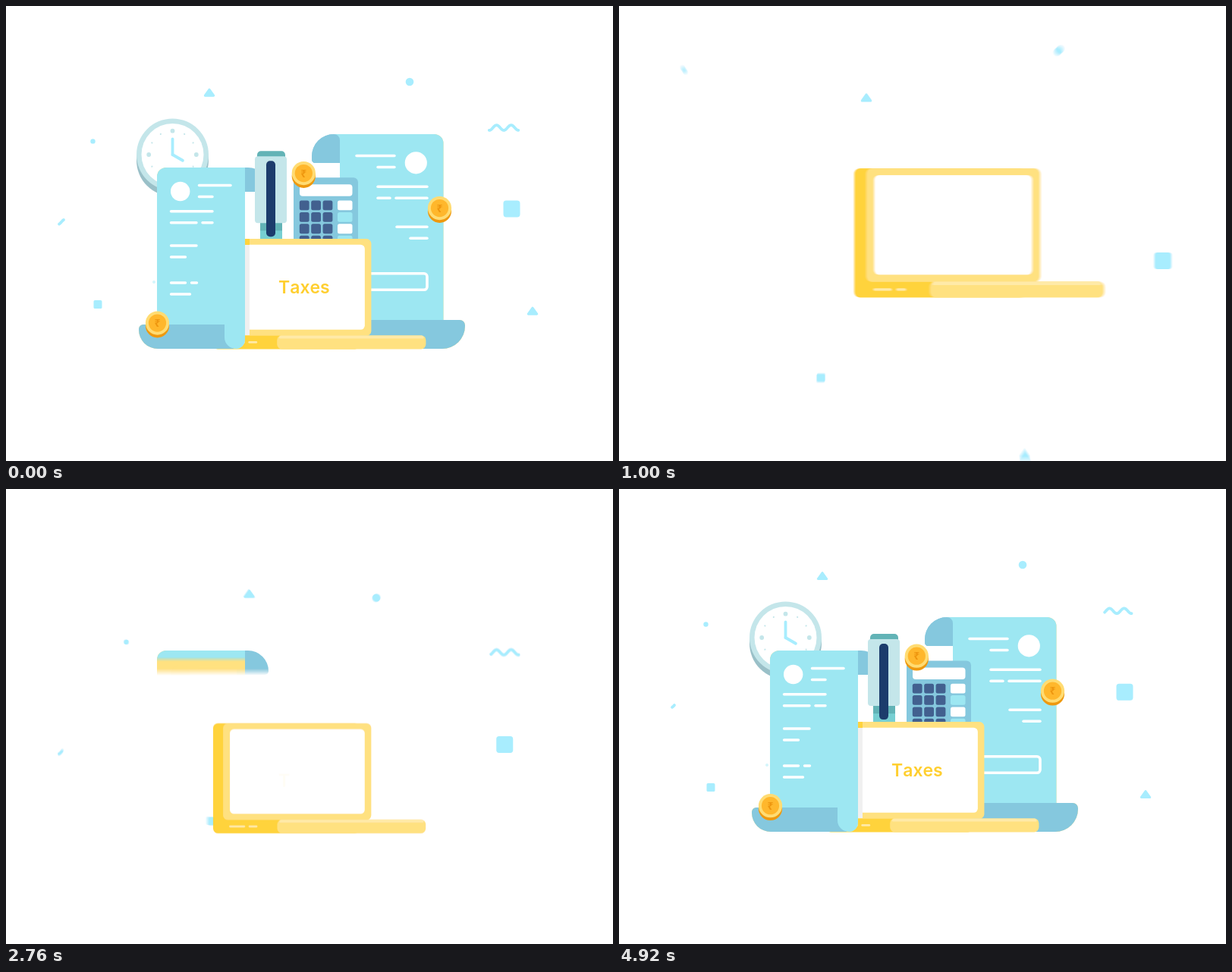
An HTML page with a canvas for the animation above (4960 ms loop, 800x600 px).

```html
<!DOCTYPE html>
<html lang="en">
<head>
<meta charset="utf-8">
<title>Taxes</title>
<style>
  html, body { margin: 0; width: 100%; height: 100%; overflow: hidden; background: #fff; }
  canvas { display: block; }
</style>
</head>
<body>
<canvas id="stage" width="800" height="600"></canvas>
<script>
const LOOP = 4960, SHUTTER = 20, TURN = 2 * Math.PI;
const SKY = '#a8edfe', PAPER = '#9de7f2', FOLD = '#85c8de', PALE = '#c4e6ea', TEAL = '#62b3b6',
      NAVY = '#1c3c6c', KEY = '#42608f', GOLD = '#ffd33c', BUTTER = '#ffe180', CREAM = '#ffeaa8', WHITE = '#fff';

const view = document.getElementById('stage').getContext('2d');
const buffer = document.createElement('canvas');
buffer.width = 800;
buffer.height = 600;
const c = buffer.getContext('2d');

// Timing
const span = (t, start, length) => Math.max(0, Math.min(1, (t - start) / length));
const mix = (a, b, p) => a + (b - a) * p;
const outQuad = p => 1 - (1 - p) ** 2;
const inOut = p => p < .5 ? 2 * p * p : 1 - 2 * (1 - p) ** 2;
const inOutCubic = p => p < .5 ? 4 * p ** 3 : 1 - 4 * (1 - p) ** 3;
const outBack = (p, k) => 1 + (k + 1) * (p - 1) ** 3 + k * (p - 1) ** 2;
const bob = t => 5 * (1 - Math.cos((t - 4850) / 1500 * TURN));
const approach = (t, decay) => Math.exp((1000 - t) / decay);

// Drawing helpers
function box(x, y, w, h, r, color) {
  c.fillStyle = color;
  c.beginPath();
  c.roundRect(x, y, w, h, r);
  c.fill();
}
function disc(x, y, r, color) {
  c.fillStyle = color;
  c.beginPath();
  c.arc(x, y, r, 0, TURN);
  c.fill();
}
function line(x1, y1, x2, y2, width, color) {
  c.strokeStyle = color;
  c.lineWidth = width;
  c.beginPath();
  c.moveTo(x1, y1);
  c.lineTo(x2, y2);
  c.stroke();
}
function placed(x, y, scale, draw, angle = 0) {
  c.save();
  c.translate(x, y);
  c.rotate(angle);
  c.scale(scale, scale);
  draw();
  c.restore();
}
function clipped(bottom, draw) {
  c.save();
  c.beginPath();
  c.rect(0, 0, 800, bottom);
  c.clip();
  draw();
  c.restore();
}

// Confetti
const square = size => () => box(-size / 2, -size / 2, size, size, size / 6, SKY);
const dot = r => () => disc(0, 0, r, SKY);
function triangle() {
  const path = new Path2D('M0-4.2L5.7 3.8H-5.7Z');
  c.fillStyle = c.strokeStyle = SKY;
  c.lineWidth = 3;
  c.fill(path);
  c.stroke(path);
}
// A part of a wave that grows from one end and then leaves at the other
const wave = (from, to, crest, start) => t => {
  const period = 1085, age = (t - start + 5 * period) % period;
  if (t - age < 1500) return;
  const head = mix(from, to, span(age, 0, 600)), tail = mix(from, to, span(age, 420, period - 420) ** 2);
  const [left, right] = head < tail ? [head, tail] : [tail, head];
  c.beginPath();
  for (let x = left; x <= right; x += .5) c.lineTo(x, -3.4 * Math.cos((x - crest) / 19.2 * TURN));
  c.strokeStyle = SKY;
  c.lineWidth = 3.8;
  c.stroke();
};
const confetti = [
  { draw: triangle, entry: [0, -21], hover: [326, 142], home: [268, 115], lift: 1.2 },
  { draw: triangle, entry: [17, 140], hover: [518, 453], home: [694, 403], lift: 1.2 },
  { draw: dot(5.3), entry: [97, -90], hover: [483, 148.5], home: [532, 100], lift: 0 },
  { draw: dot(3.2), entry: [-78, -121], hover: [163.5, 205], home: [114.5, 178.5], lift: .2 },
  { draw: square(22), entry: [60, -1], hover: [657, 337], home: [666.5, 268], lift: 1, lag: 230 },
  { draw: square(11), entry: [-21, 48], hover: [287, 442.5], home: [121, 393.5], lift: 0 },
  { draw: wave(-24, 24, -16, 4880), entry: [0, 0], hover: [94, 353.5], home: [94, 285], lift: .9 },
  { draw: wave(25, -25, -4.5, 4490), entry: [0, 0], hover: [651, 222], home: [651, 161], lift: .9 }
];
function drawConfetti(t) {
  for (const { draw, entry, hover, home, lift, lag = 0 } of confetti) {
    const p = inOut(span(t, 2650 + lag, 510)), away = approach(t, 320), rise = lift * p * bob(t);
    const [x, y] = hover.map((v, axis) => mix(v, home[axis], p) + entry[axis] * away);
    placed(x, y - rise, 1, () => draw(t), -.008 * rise);
  }
}

// A streak grows out of (x, y) and catches up with itself
function drawStreak(t, start, x, y, dx, dy, width, color) {
  const p = (t - start) / 400;
  if (p <= 0 || p >= 1) return;
  const head = outQuad(p), tail = p * p;
  line(x + dx * tail, y + dy * tail, x + dx * head, y + dy * head, width, color);
}
function drawStreaks(t) {
  for (const start of [1700, 2200]) {
    drawStreak(t, start, 140, 261, 170, 0, 5, SKY);
    drawStreak(t, start, 182, 248.5, 104, 0, 2.5, BUTTER);
    drawStreak(t, start, 182, 244.5, 104, 0, 1.2, FOLD);
    drawStreak(t, start, 488, 334, 110, 0, 5, SKY);
    drawStreak(t, start, 564, 314.5, 15, 0, 5, SKY);
  }
  drawStreak(t, 2960, 535, 159, 32, 0, 3.5, BUTTER);
  drawStreak(t, 2960, 528, 411, 48, 0, 4, SKY);
}

// Scrolls: a yellow sheet runs ahead of the blue one
const unrolled = (t, top, start) => top + (453 - top) * inOut(span(t, start, 500));
const leftEdge = t => unrolled(t, 213, 2640);
const rightEdge = t => unrolled(t, 169, 3033);

function unroll(t, edge, draw) {
  clipped(edge(t), () => draw(BUTTER, BUTTER, BUTTER));
  clipped(edge(t - 44), () => draw(PAPER, FOLD, WHITE));
}
// Rows of strokes with gaps between them; direction -1 aligns them to the right
function writing(x, y, direction, color, ...rows) {
  rows.forEach((widths, i) => {
    let pen = x;
    for (const width of widths) {
      line(pen, y + i * 15, pen + direction * width, y + i * 15, 3.4, color);
      pen += direction * (width + 8);
    }
  });
}
function drawLeftScroll(t) {
  unroll(t, leftEdge, (light, dark, ink) => {
    box(199, 213, 116, 215, [12, 0, 0, 0], light);
    box(175, 420, 125, 32, [6, 0, 0, 25], dark);
    box(288, 419, 27, 33, [0, 0, 12, 15], light);
    disc(229.7, 244.5, 12.7, ink);
    writing(254.5, 236.5, 1, ink, [41.5], [17.5]);
    writing(217.5, 270.7, 1, ink, [54.5], [33.5, 13]);
    writing(217.5, 316, 1, ink, [33.5], [19]);
    writing(217.5, 365, 1, ink, [19, 7], [25]);
  });
}
function drawLeftCurl(t) {
  clipped(leftEdge(t), () => box(304, 213, 42, 32, [0, 27, 5, 0], FOLD));
}
function drawRightScroll(t) {
  unroll(t, rightEdge, (light, dark, ink) => {
    box(430, 169, 12, 14, 0, light);
    box(403, 169, 37, 38, [33, 9, 0, 5], FOLD);
    box(440, 169, 136.5, 250, [0, 12, 0, 0], light);
    box(440, 414, 165, 38, [0, 7, 30, 0], dark);
    disc(540.3, 206.8, 14.6, ink);
    writing(512, 197.5, -1, ink, [50], [22]);
    writing(555, 238.3, -1, ink, [65], [41, 16]);
    writing(555, 291.3, -1, ink, [40], [22]);
    c.lineWidth = 3.6;
    c.beginPath();
    c.roundRect(450, 352.8, 105, 21.5, 4);
    c.stroke();
  });
}

function drawClock(t) {
  if (t < 3300) return;
  const hand = (degrees, length) => placed(0, 0, 1, () => line(0, 0, 0, -length, 3.8, SKY), degrees / 360 * TURN);
  placed(219.5, 196, outBack(span(t, 3300, 320), 1.6), () => {
    disc(0, 7.5, 47.5, '#9ac0c8');
    disc(0, 0, 47.5, PALE);
    disc(0, 0, 41, WHITE);
    for (let i = 0; i < 12; i++)
      placed(0, 0, 1, () => disc(0, -31.3, i % 3 ? 1.1 : 2.9, PALE), i / 12 * TURN);
    const hour = 90 + 30 * inOutCubic(span(t, 3620, 1000));
    hand(hour * 12, 20.5);
    hand(hour, 15.5);
  });
}

function drawStapler(t) {
  if (t < 3090) return;
  const rise = start => .5 * bob(t) + 117 * (1 - outQuad(span(t, start, 400)));
  placed(0, rise(3090), 1, () => {
    box(335, 284, 29, 36, 0, '#77cfd2');
    box(335, 284, 29, 12, 0, TEAL);
    box(331, 191, 37, 14, [5, 5, 0, 0], TEAL);
    box(328, 198, 42, 88, 4, PALE);
  });
  placed(0, rise(3190), 1, () => box(343, 204, 12, 100, 5, NAVY));
}

function drawCalculator(t) {
  if (t < 2850) return;
  placed(379, 226.5 + 91.5 * (1 - outQuad(span(t, 2850, 365))) - .25 * bob(t), 1, () => {
    box(0, 0, 85, 100, 6, FOLD);
    box(8, 9, 69.5, 15.5, 4, WHITE);
    for (let row = 0; row < 4; row++) {
      const y = 30.2 + row * 15.4;
      for (let col = 0; col < 3; col++) box(7.8 + col * 15.4, y, 12.8, 12.8, 2.5, KEY);
      box(58, y, 19.5, 12.8, 2.5, row % 2 ? PAPER : WHITE);
    }
  });
}

function drawSpinner(t) {
  const size = Math.min(span(t, 1250, 200), 1 - span(t, 2440, 120));
  if (size <= 0) return;
  const end = .38 + (t - 2400) / 700 * TURN;
  c.strokeStyle = GOLD;
  c.lineWidth = 5;
  c.beginPath();
  c.arc(380.5, 291, 18.7, end - 2.05 * size, end);
  c.stroke();
}

function drawLaptop(t) {
  const away = approach(t, 270), down = t < 2440 ? 0 : outBack(span(t, 2440, 360), 2.2);
  placed(413 + 62 * away, 299 + 80.5 * down, (1 + .055 * away) * (1 - .1 * down), () => {
    c.translate(-413, -299);
    box(257, 218.5, 215, 161.5, 7, GOLD);
    box(271.5, 218.5, 217.5, 142, 7, BUTTER);
    box(281.5, 227, 198, 124.5, 6, WHITE);
    box(351, 360, 218, 20, 7, BUTTER);
    box(354, 360, 212, 4.5, [6, 6, 2, 2], CREAM);
    line(282, 370, 302.5, 370, 3.2, CREAM);
    line(310.5, 370, 320.5, 370, 3.2, CREAM);
    drawSpinner(t);
  });
}
function drawScreenShade(t) {
  if (t < 2890) return;
  clipped(leftEdge(t), () => {
    box(315, 307, 6, 8, 0, GOLD);
    box(315, 315, 6, 119, 0, '#f0f0f0');
  });
}

function drawTitle(t) {
  c.font = '600 23px Inter, sans-serif';
  c.fontKerning = 'none';
  c.textAlign = 'left';
  c.fillStyle = '#ffcf30';
  let x = 359;
  [...'Taxes'].forEach((letter, i) => {
    const p = span(t, 2750 + i * 70, 400);
    c.globalAlpha = p;
    c.fillText(letter, x, 379 + 14 * (1 - p));
    x += c.measureText(letter).width;
  });
  c.globalAlpha = 1;
}

function drawCoin(t, x, y, start, length) {
  if (t < start) return;
  placed(x, mix(-30, y, outQuad(span(t, start, length))) + bob(t), 1, () => {
    disc(0, 3.8, 15.6, '#ee990f');
    disc(0, 0, 15.6, '#ffdc73');
    disc(0, 0, 11.6, '#ffb72c');
    c.font = '700 14px "Noto Sans", "DejaVu Sans", sans-serif';
    c.textAlign = 'center';
    c.fillStyle = '#ee960f';
    c.fillText('₹', 0, 5);
  });
}

function drawScene(t) {
  drawConfetti(t);
  if (t > 3300) disc(195, 364, 2, '#d4f5fb');
  drawClock(t);
  drawRightScroll(t);
  drawLeftCurl(t);
  drawStapler(t);
  drawCalculator(t);
  drawStreaks(t);
  drawLaptop(t);
  drawScreenShade(t);
  drawStreak(t, 2960, 324.5, 361, 0, 65, 3, '#8ed4e0');
  drawLeftScroll(t);
  drawTitle(t);
  drawCoin(t, 199.5, 417.5, 2770, 500);
  drawCoin(t, 571.5, 266, 3008, 400);
  drawCoin(t, 392.3, 220, 3200, 400);
}

// The finished scene drops out while the next round flies in
function drawMoment(t) {
  c.fillStyle = WHITE;
  c.fillRect(0, 0, 800, 600);
  c.lineCap = c.lineJoin = 'round';
  if (t < 600) placed(0, 105 * Math.max(0, t / 320) ** 3, 1, () => drawScene(t + LOOP));
  if (t > 400) drawScene(t);
}

// Motion blur: average several moments within the open shutter
function render(t) {
  const samples = t < 40 || t > 3800 ? 1 : 10;
  for (let i = 0; i < samples; i++) {
    drawMoment(t + ((i + .5) / samples - .5) * SHUTTER);
    view.globalAlpha = 1 / (i + 1);
    view.drawImage(buffer, 0, 0);
  }
}

const begin = performance.now();
function tick() {
  render((performance.now() - begin) % LOOP);
  requestAnimationFrame(tick);
}
tick();
</script>
</body>
</html>
```
